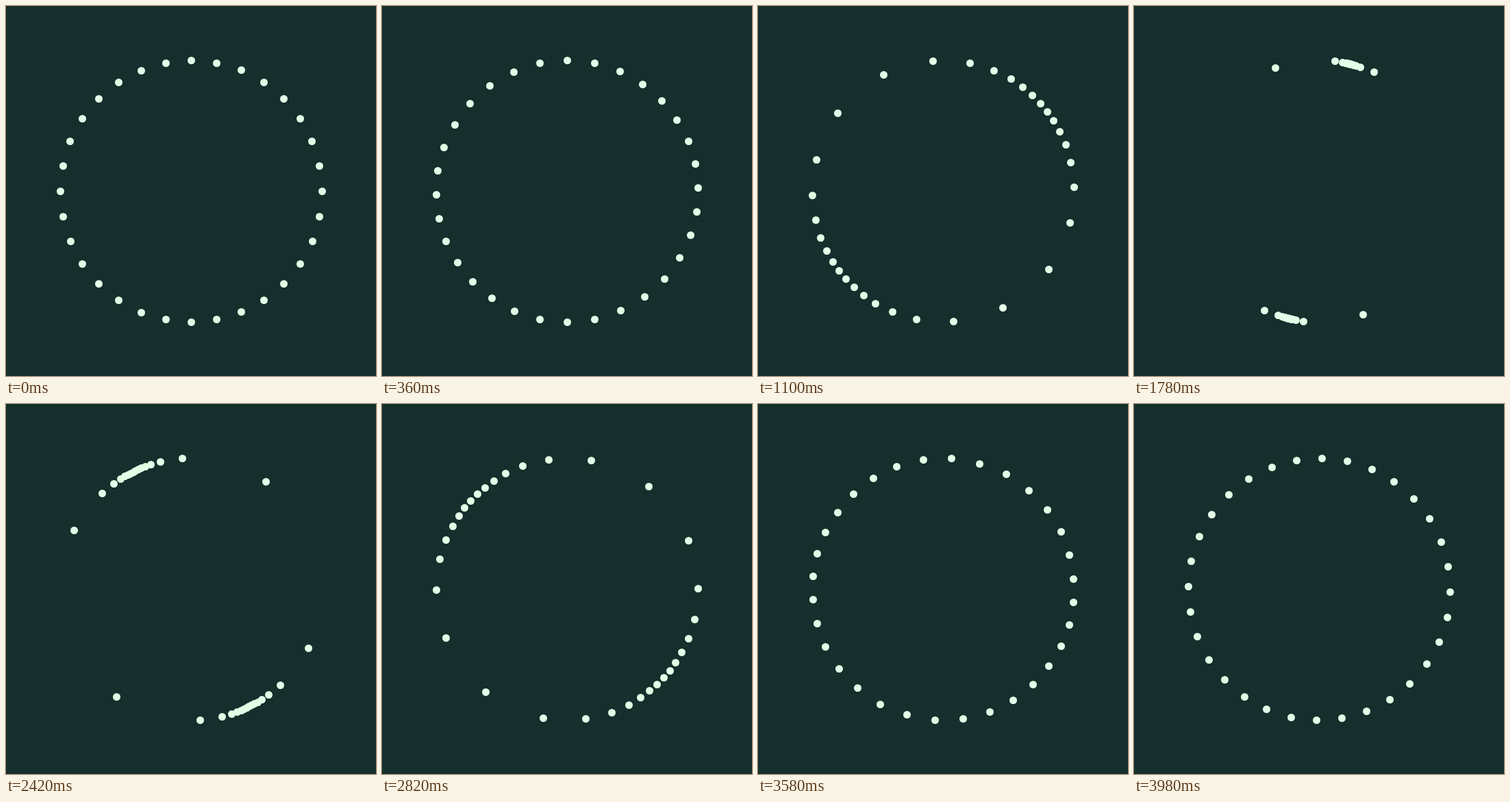
An HTML page with a canvas for the animation above (4 s loop, 540 by 540 pixels).

```html
<!DOCTYPE html>
<html lang="en">
<head>
<meta charset="utf-8">
<title>Ring of dots</title>
<style>
  html, body { margin: 0; width: 100%; height: 100%; overflow: hidden; background: #162e2c; }
  canvas { display: block; width: 540px; height: 540px; }
</style>
</head>
<body>
<canvas id="stage" width="540" height="540"></canvas>
<script>
  const SIZE = 540, LOOP = 4000, COUNT = 32;
  const CENTER = 270.5, RING = 191, DOT = 5.5;
  const ctx = document.getElementById('stage').getContext('2d');
  const start = performance.now();

  // Turn the ring in 3D about the axis (1, 0, -1), then push each dot back out to the rim.
  function place(angle, turn) {
    const c = Math.cos(turn), s = Math.sin(turn) / Math.SQRT2;
    const u = Math.cos(angle), v = Math.sin(angle);
    const dir = Math.atan2(c * v - s * u, (1 + c) / 2 * u + s * v);
    return [Math.cos(dir), Math.sin(dir)].map(k => CENTER + Math.round(RING * k));
  }

  function draw() {
    const time = (performance.now() - start) % LOOP;
    const turn = time / LOOP * 2 * Math.PI;
    ctx.fillStyle = '#162e2c';
    ctx.fillRect(0, 0, SIZE, SIZE);
    ctx.fillStyle = '#e3ffe7';
    for (let i = 0; i < COUNT; i++) {
      const [x, y] = place(i / COUNT * 2 * Math.PI, turn);
      ctx.beginPath();
      ctx.arc(x, y, DOT, 0, 2 * Math.PI);
      ctx.fill();
    }
    requestAnimationFrame(draw);
  }
  draw();
</script>
</body>
</html>
```
